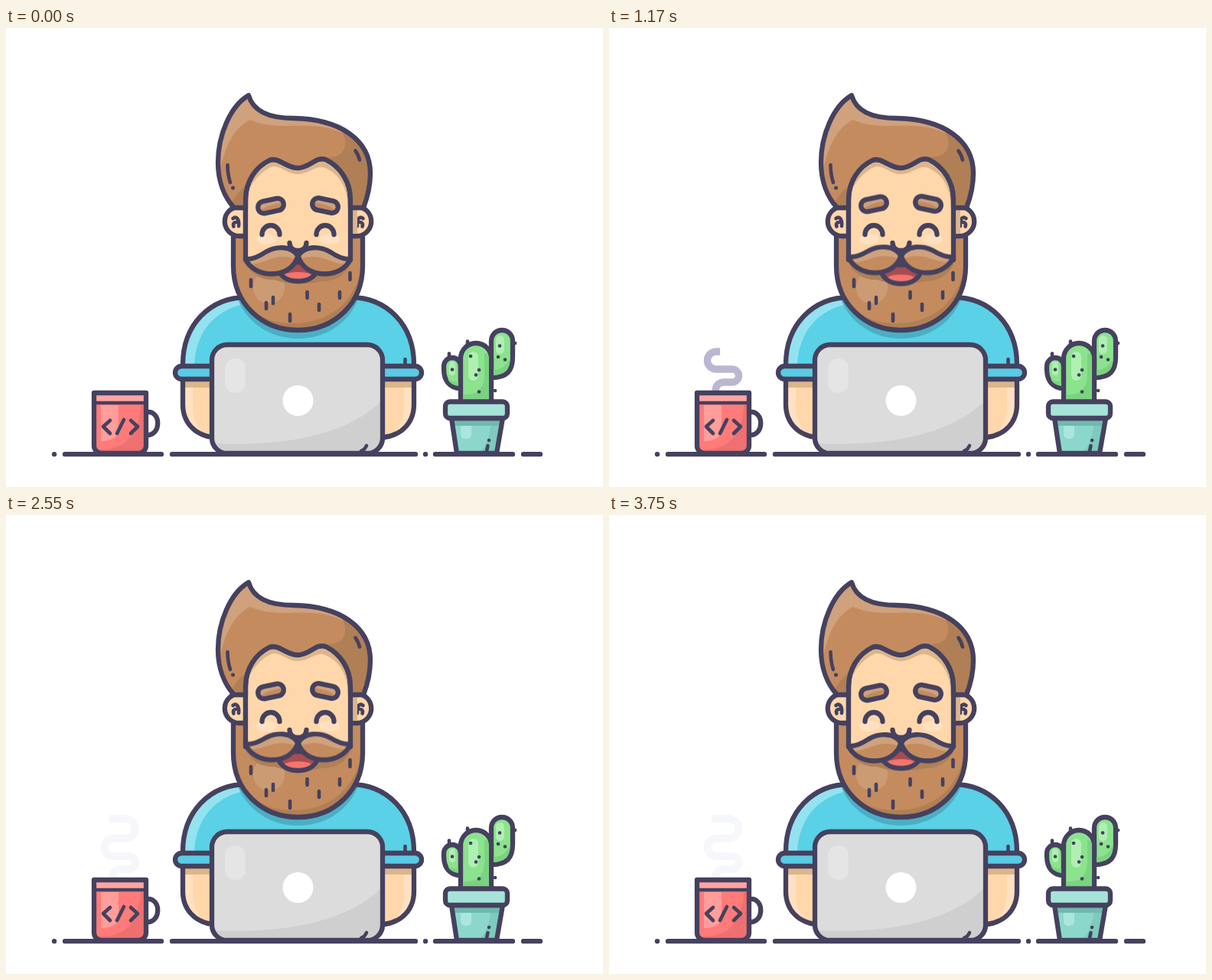
These frames come from a looping animation (780x600 px, 3780 ms). An HTML page:

```html
<!DOCTYPE html>
<html lang="en">
<head>
<meta charset="utf-8">
<title>Laughing at the laptop</title>
<style>
html, body { margin: 0; width: 100%; height: 100%; overflow: hidden; background: #fff; }
svg { display: block; width: 780px; height: 600px; }
.o { stroke: #45415e; stroke-width: 6.3; stroke-linecap: round; stroke-linejoin: round; }
.n { fill: none; }
.t { stroke-width: 4.6; }
.ink { fill: #45415e; }
.hair { fill: #c48b5f; }
.hairLight { fill: #cfa17c; }
.hairDark { fill: #b07f55; }
.skin { fill: #ffd7ab; }
.skinDark { fill: #dbb58b; }
.skinLight { fill: #ffe1c2; }

.head { animation: bob 3780ms infinite; }
.brows, .mouth, .wing { animation: 236.25ms ease-in-out infinite alternate; }
.brows { animation-name: lift; }
.mouth { animation-name: open; }
.wing { transform-origin: 381px 298px; animation-name: tilt; }
@keyframes bob {
  0% { transform: none; animation-timing-function: ease-in-out; }
  14.286% { transform: translateY(3px); animation-timing-function: ease-in-out; }
  28.571%, 100% { transform: none; }
}
@keyframes lift { to { transform: translateY(-2.3px); } }
@keyframes open { to { transform: translateY(3.3px); } }
@keyframes tilt { to { transform: rotate(2.5deg); } }

.steam, .trace { fill: none; stroke-dasharray: 100 200; stroke-dashoffset: 100.5; }
.steam { stroke: #bbb7d1; stroke-width: 9.4; animation: rise 3780ms infinite, fade 3780ms linear infinite; }
.trace { stroke: #f6f7fa; stroke-width: 10; animation: trail 3780ms infinite; }
@keyframes rise {
  0%, 1% { stroke-dashoffset: 100.5; animation-timing-function: cubic-bezier(.33, 0, .66, 1); }
  53%, 100% { stroke-dashoffset: 0; }
}
@keyframes trail {
  0%, 29% { stroke-dashoffset: 100.5; animation-timing-function: cubic-bezier(.37, 0, .63, 1); }
  69%, 100% { stroke-dashoffset: 0; }
}
@keyframes fade {
  0%, 37% { stroke-opacity: 1; }
  66%, 100% { stroke-opacity: 0; }
}
</style>
</head>
<body>
<svg viewBox="0 0 780 600">
<defs>
  <path id="shirt" d="M231 444V440C231 388 266 352 315 352H449C498 352 533 388 533 440V444Z"/>
  <path id="beard" d="M297 270V311C297 360 334 395 381.500 395S466 360 466 311V270Z"/>
  <path id="face" d="M313 303V224C313 202 325 182 344 173C356 168 366 183 381.500 183S405 167 418 172C438 182 450 202 450 224V303Z"/>
  <path id="hair" d="M298 235C285 221 277 200 277 176C277 140 293 102 317 88C322 106 340 118 376 118C436 119 476 146 476 190C476 206 472 222 467 235H450V224C450 202 438 182 418 172C405 167 397 183 381.500 183S356 168 344 173C325 182 313 202 313 224V235Z"/>
  <path id="whisker" d="M381.500 298C373 284 353 285 339 293C330 299 322 303 313 302C318 314 332 321.500 346 321.500C364 321.500 377 313 381.500 298Z"/>
  <path id="lips" d="M353 306C355 324 367 331 381.500 331S408 324 410 306Z"/>
  <path id="lid" d="M289 414H472A20 20 0 0 1 492 434V536A20 20 0 0 1 472 556H289A20 20 0 0 1 269 536V434A20 20 0 0 1 289 414Z"/>
  <path id="cup" d="M115 477H183V546A10 10 0 0 1 173 556H125A10 10 0 0 1 115 546Z"/>
  <path id="pot" d="M582 510L589 556H641L649 510Z"/>
  <path id="curl" pathLength="100" d="M139 476Q139 463 151 463H161A8.500 8.500 0 0 0 161 446H140A11.500 11.500 0 0 1 140 423H156A13 13 0 0 0 156 397H134"/>
  <clipPath id="inShirt"><use href="#shirt"/></clipPath>
  <clipPath id="inBeard"><use href="#beard"/></clipPath>
  <clipPath id="inFace"><use href="#face"/></clipPath>
  <clipPath id="inHair"><use href="#hair"/></clipPath>
  <clipPath id="inWhisker"><use href="#whisker"/></clipPath>
  <clipPath id="inLips"><use href="#lips"/></clipPath>
  <clipPath id="inLid"><use href="#lid"/></clipPath>
  <clipPath id="inCup"><use href="#cup"/></clipPath>
  <clipPath id="inPot"><use href="#pot"/></clipPath>
  <g id="tash">
    <use href="#whisker" class="hair"/>
    <path class="hairLight" clip-path="url(#inWhisker)" d="M312 309C330 310 338 304 349 301C360 298 369 299 376 301L380 285H312Z"/>
    <use href="#whisker" class="o n"/>
  </g>
</defs>

<!-- steam -->
<use href="#curl" class="steam"/>
<use href="#curl" class="trace"/>

<!-- arms and shirt -->
<g id="arm">
  <path class="skin" d="M231 460V492C231 515 246 532 270 535V460Z"/>
  <path class="skinLight" d="M233 470H244V500Q246 518 258 531Q234 522 233 492Z"/>
  <path class="skinDark" d="M231 460H270V470H231Z"/>
  <path class="o n" d="M231 460V492C231 515 246 532 270 535"/>
</g>
<use href="#arm" transform="matrix(-1 0 0 1 764 0)"/>
<use href="#shirt" fill="#5ad1e6"/>
<g clip-path="url(#inShirt)">
  <path fill="#93e2f0" d="M231 444H246C246 400 272 366 318 360V350H231Z"/>
  <g class="head"><use href="#beard" y="11" fill="#4bafc3"/></g>
</g>
<use href="#shirt" class="o n"/>
<path class="o t" d="M521.500 433V441"/>
<rect class="o" x="221" y="442" width="70" height="17" rx="8.500" fill="#5acbe4"/>
<rect class="o" x="473" y="442" width="70" height="17" rx="8.500" fill="#5acbe4"/>

<!-- head -->
<g class="head">
  <use href="#beard" class="hair"/>
  <g clip-path="url(#inBeard)">
    <path class="hairDark" d="M466 300C462 352 428 386 375 386C345 386 325 375 310 358V400H470V300Z"/>
    <rect fill="#cb9b74" x="323" y="318" width="41" height="42" rx="20"/>
    <path class="hairDark" d="M313 306C320 322 334 330 350 329C370 336 396 336 412 331C432 332 448 320 452 303Z"/>
  </g>
  <use href="#beard" class="o n"/>
  <path class="o n t" d="M320 329V338M349 352V360M340 359V367M371 374V383M393.500 345V353M409 361V369M436 345V353M449.500 320V329"/>

  <g id="ear">
    <path class="o skin" d="M313 233.500H305A19.250 19.250 0 0 0 305 272H313Z"/>
    <path class="o n t" d="M296.500 249C301 245 305 250 304 259M303 254C298 253 296 256 297.500 259.500"/>
  </g>
  <use href="#ear" transform="matrix(-1 0 0 1 763 0)"/>
  <path class="skinDark" d="M453 237H459V269H453Z"/>

  <use href="#face" class="skin"/>
  <g clip-path="url(#inFace)">
    <path class="skinDark" d="M313 228C316 206 330 190 346 182C357 177 366 191 381.500 191S405 178 417 183C438 192 445 210 447 232V303H452V165H313Z"/>
    <ellipse class="skinLight" cx="340" cy="276" rx="13" ry="7"/>
    <ellipse class="skinLight" cx="423" cy="276" rx="13" ry="7"/>
  </g>
  <use href="#face" class="o n"/>

  <use href="#hair" class="hair"/>
  <g clip-path="url(#inHair)">
    <path class="hairLight" d="M274 215C282 164 293 133 319 120C342 131 368 127 398 128C419 129 431 133 443 139L430 110L317 80L270 130Z"/>
    <path class="hairDark" d="M434 128C447 143 447 164 429 168C419 169 413 172 424 176C442 186 451 205 450 240H480V130Z"/>
    <path class="hairDark" d="M313 207Q302 214 294 230L298 238H313Z"/>
  </g>
  <use href="#hair" class="o n"/>
  <path class="o n t" d="M289.500 179Q289.500 191 293 202M456.500 160.500Q460 165 462 172.500"/>
  <circle class="ink" cx="296.500" cy="209" r="2.500"/>

  <g class="brows">
    <g id="brow" transform="translate(346 232.500) rotate(-12)">
      <rect class="hair" x="-17" y="-8" width="34" height="16" rx="8"/>
      <path class="hairLight" d="M-15 4Q-9 -2 15 -1V-6H-11Q-16 -4 -15 4Z"/>
      <rect class="o n" x="-17" y="-8" width="34" height="16" rx="8"/>
    </g>
    <use href="#brow" transform="matrix(-1 0 0 1 763 -.5)"/>
  </g>
  <path class="o n" d="M334.500 270A11.500 12 0 0 1 357.500 270M405.500 270A11.500 12 0 0 1 428.500 270"/>
  <path class="o n" d="M370.500 281C371 288 376 291 381.500 291S392 288 392.500 281"/>

  <g class="mouth">
    <use href="#lips" fill="#a84c50"/>
    <ellipse cx="381.500" cy="330" rx="25" ry="11" fill="#f4756d" clip-path="url(#inLips)"/>
    <use href="#lips" class="o n"/>
  </g>
  <g class="wing"><use href="#tash"/></g>
  <g transform="matrix(-1 0 0 1 763 0)"><g class="wing"><use href="#tash"/></g></g>
</g>

<!-- desk -->
<path class="o n" d="M77 557.200H203M217 557.200H535M561 557.200H662M676 557.200H698M63 557.200H63.100M548 557.200H548.100"/>

<!-- laptop -->
<use href="#lid" fill="#dcdcdc"/>
<g clip-path="url(#inLid)">
  <path fill="#cfcfcf" d="M269 543C360 547 445 534 492 486V560H269Z"/>
  <rect x="286" y="432" width="27" height="45" rx="13" fill="#e5e5e5"/>
</g>
<use href="#lid" class="o n"/>
<path class="o n t" d="M471 546Q469 551 464 553"/>
<circle cx="381.500" cy="487" r="20" fill="#fff"/>

<!-- mug -->
<path class="o n" d="M184 502C203 500 203 533 184 532"/>
<use href="#cup" fill="#ff7b79"/>
<g clip-path="url(#inCup)">
  <path fill="#ff9d9b" d="M124 493H147V531Q137 541 124 540Z"/>
  <path fill="#ee7070" d="M115 551C150 553 173 540 176 493H185V558H115Z"/>
  <path fill="#ffa5a3" d="M115 477H183V490H115Z"/>
</g>
<use href="#cup" class="o n"/>
<path class="o n t" d="M117 490H181"/>
<path class="o n t" d="M136 513L127 521L136 530M154 512L145 530M163 513L172 521L163 530"/>

<!-- cactus -->
<g fill="#8be38d">
  <path class="o" d="M594 471C579 471 572 460 572 446V442A11 11 0 0 1 594 442Z"/>
  <path class="o" d="M634 457C655 457 662 448 662 430V409A14 14 0 0 0 634 409Z"/>
  <path class="o" d="M594 489V432A20 20 0 0 1 634 432V489Z"/>
</g>
<path fill="#7bd280" d="M625 425Q631 425 631 433V486H597V479Q624 481 625 455ZM637 447Q652 447 659 430Q658 453 637 454ZM577 459Q583 463 591 462V468Q581 467 577 459Z"/>
<g fill="#b0efb2">
  <rect x="604" y="423" width="13" height="38" rx="6.500"/>
  <rect x="579" y="436" width="8" height="18" rx="4"/>
  <rect x="640" y="402" width="11" height="24" rx="5.500"/>
</g>
<path class="o n t" d="M607 429h.1M618 447h.1M614 453.500h.1M618 475.500h.1M639 474h.1M583 446.500h.1M645 415.500h.1M652 433.500h.1M643 430h.1M665 412h.1M579 425.500V428M603 409.500V412"/>

<!-- pot -->
<use href="#pot" fill="#8cd7cb"/>
<g clip-path="url(#inPot)">
  <path fill="#7ecabe" d="M634 510H650V558H612Q632 550 634 510Z"/>
  <rect x="594" y="505" width="14" height="32" rx="6" fill="#abe6de"/>
  <path fill="#6fb9ae" d="M580 510H652V520H580Z"/>
</g>
<use href="#pot" class="o n"/>
<rect class="o" x="574" y="488.500" width="81" height="21.500" rx="6" fill="#a6e3d9"/>
<path class="o n t" d="M629.500 546L628 553M631 539h.1"/>
</svg>
</body>
</html>
```
